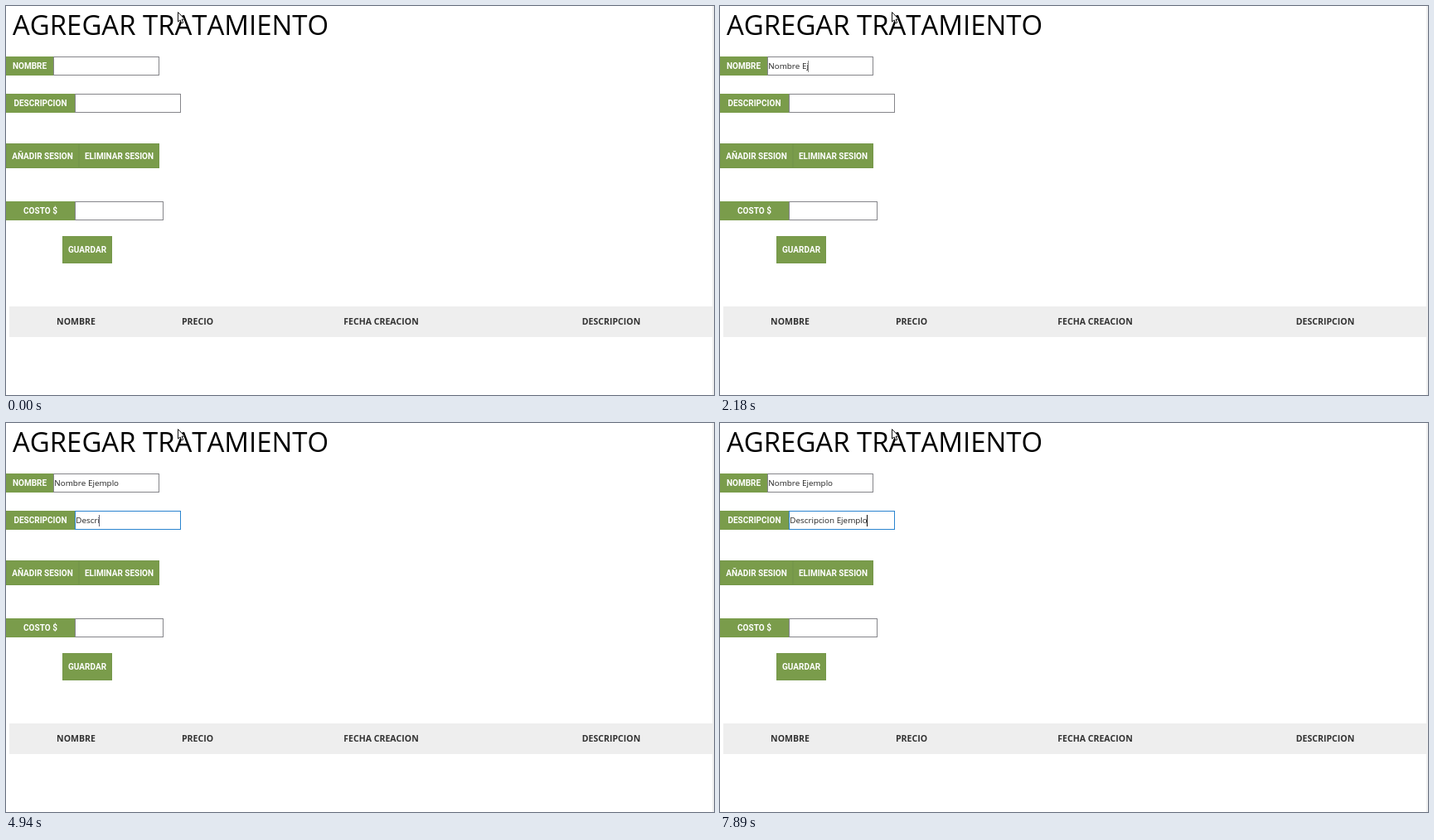
An HTML page with a canvas that plays this animation: 854 px wide and 470 px high, repeating every 8 s.

```html
<!DOCTYPE html>
<html lang="es">
<head>
<meta charset="utf-8">
<title>Agregar tratamiento</title>
<style>
html, body { margin: 0; width: 100%; height: 100%; overflow: hidden; background: #fff; }
canvas { display: block; }
</style>
</head>
<body>
<canvas id="stage" width="854" height="470"></canvas>
<script>
const ctx = document.getElementById('stage').getContext('2d');
const LOOP = 8000;
const PACE = 80; // ms between the keys of one burst
const GREEN = '#7a9c4b', EDGE = '#75974a', GRAY = '#85858a';
const BODY = '"Open Sans", sans-serif';
const LABEL = 'bold 10px Roboto, sans-serif';

// Typing bursts by start time; '<' is a backspace.
const nameKeys = { 1000: 'N', 1260: 'o', 1420: 'mbre ', 1990: 'E', 2180: 'jemp', 2940: 'l', 3230: 'o' };
const descKeys = { 4110: 'D', 4460: 'escri', 5000: 'p', 5200: '<', 5760: 'pcion', 6230: ' Ej',
                   6580: 'e', 6780: 'mpl', 7760: 'o' };

function rect(x, y, w, h, color) {
  ctx.fillStyle = color;
  ctx.fillRect(x, y, w, h);
}

function frame(x, y, w, h, color) {
  ctx.strokeStyle = color;
  ctx.lineWidth = 1;
  ctx.strokeRect(x + 0.5, y + 0.5, w - 1, h - 1);
}

function text(str, x, y, font, color, align = 'left') {
  ctx.font = font;
  ctx.fillStyle = color;
  ctx.textAlign = align;
  ctx.fillText(str, x, y);
}

function label(str, x, y, w, h = 23) {
  rect(x, y, w, h, GREEN);
  text(str, x + w / 2, y + h / 2 + 3.6, LABEL, '#fff', 'center');
}

function button(str, x, y, w, h) {
  label(str, x, y, w, h);
  frame(x, y, w, h, EDGE);
}

function typed(bursts, t) {
  let out = '';
  for (const [start, keys] of Object.entries(bursts)) {
    const count = t < start ? 0 : 1 + Math.floor((t - start) / PACE);
    for (const key of keys.slice(0, count)) out = key === '<' ? out.slice(0, -1) : out + key;
  }
  return out;
}

function input(x, y, w, border, str = '', caret = null) {
  rect(x, y, w, 23, '#fff');
  frame(x, y, w, 23, border);
  text(str, x + 1.3, y + 15, '9.85px ' + BODY, '#222');
  if (caret) {
    const end = x + Math.max(2, Math.floor(1.3 + ctx.measureText(str).width));
    rect(end, y + 5, 1, 14, caret);
  }
}

function pointer(x, y) {
  ctx.save();
  ctx.translate(x, y);
  const arrow = new Path2D('M0 0V11.5L2.6 9.4L4.4 13.4L6.3 12.6L4.6 8.7L8 8.4Z');
  ctx.fillStyle = '#fff';
  ctx.fill(arrow);
  ctx.strokeStyle = '#111';
  ctx.stroke(arrow);
  ctx.restore();
}

function draw(t) {
  rect(0, 0, 854, 470, '#fff');
  rect(852, 0, 2, 470, '#efefef');
  ctx.fontKerning = 'none';

  text('AGREGAR TRATAMIENTO', 8, 35, '32.9px ' + BODY, '#000');

  const hover = t >= 490 && t < 740;
  const nameCaret = t >= 490 && t < 3260;
  label('NOMBRE', 0, 61, 57);
  input(57, 61, 128, hover ? '#222' : GRAY, typed(nameKeys, t), nameCaret && '#888');

  const focus = t >= 3620;
  const descCaret = focus && !(t >= 7360 && t < 7760);
  label('DESCRIPCION', 0, 106, 83);
  input(83, 106, 128, focus ? '#2a84cf' : GRAY, typed(descKeys, t),
        descCaret && (t < 5200 ? '#667' : '#111'));

  button('AÑADIR SESION', 0, 166, 88, 30);
  button('ELIMINAR SESION', 88, 166, 97, 30);

  label('COSTO $', 0, 236, 83);
  input(83, 236, 107, GRAY);
  button('GUARDAR', 68, 278, 60, 33);

  rect(4, 363, 850, 37, '#eee');
  const heads = { 'NOMBRE': 84.5, 'PRECIO': 231, 'FECHA CREACION': 452.5, 'DESCRIPCION': 730 };
  for (const [str, x] of Object.entries(heads)) {
    text(str, x, 385, 'bold 10.55px ' + BODY, '#333', 'center');
  }

  pointer(207.5, 7.5);
}

const start = performance.now();
function tick() {
  draw((performance.now() - start) % LOOP);
  requestAnimationFrame(tick);
}
tick();
</script>
</body>
</html>
```
